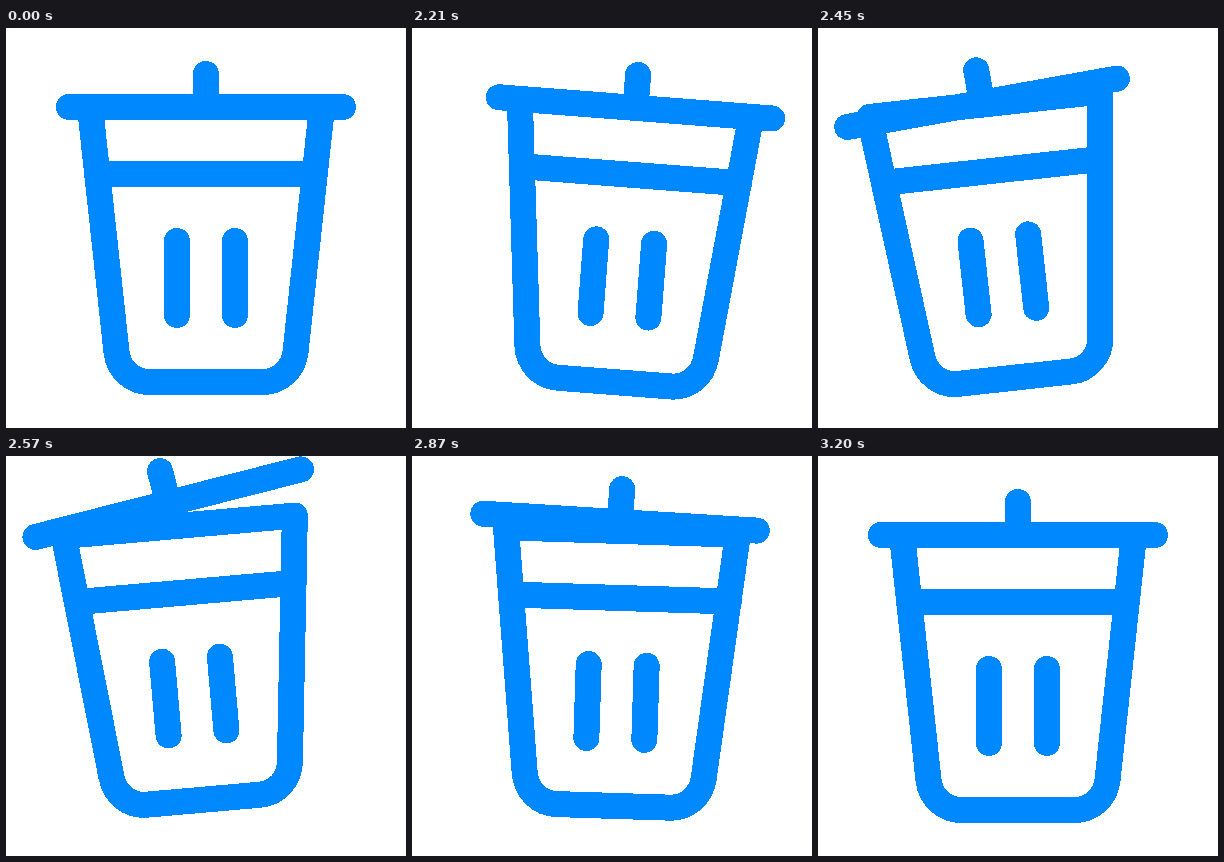
Recreate the animation shown at these times as an HTML page. Size 400 by 400 pixels, loop 3230 ms.

```html
<!DOCTYPE html>
<html lang="en">
<head>
<meta charset="utf-8">
<title>Trash can</title>
<style>
  html, body { margin: 0; height: 100%; overflow: hidden; background: #fff; }
  svg { display: block; width: 100vw; height: 100vh; shape-rendering: crispEdges; }
  g { fill: none; stroke: #08f; stroke-width: 26; stroke-linecap: round; stroke-linejoin: round; }
</style>
</head>
<body>
<svg viewBox="0 0 400 400">
  <g id="can">
    <path d="M84 79L110.500 324C112.500 341 126 354 143 354H257C274 354 287.500 341 289.500 324L316 79Z"/>
    <path d="M91 146H309M171 213V287M229 213V287"/>
    <g id="lid"><path d="M63 79H337M200 46V79"/></g>
  </g>
</svg>
<script>
const LOOP = 3230, START = 2030, STEP = 30;

// Smooth rise from 0 to 1 at the peak and back to 0 at the end.
function hump(t, start, peak, end) {
  if (t <= start || t >= end) return 0;
  const p = t < peak ? (t - start) / (peak - start) : (end - t) / (end - peak);
  return (1 - Math.cos(Math.PI * p)) / 2;
}

function pose(id, x, y, turn, pivotY) {
  document.getElementById(id).setAttribute('transform',
    `translate(${x} ${y}) rotate(${turn} 200 ${pivotY})`);
}

function draw() {
  const now = performance.now() % LOOP;
  const t = now < START ? 0 : START + Math.floor((now - START) / STEP) * STEP;

  // The can sways right, left, right, hops in between and lands on its left.
  const sway = 4.8 * hump(t, 2030, 2250, 2470) - 6.5 * hump(t, 2250, 2470, 2840)
    + 2.2 * hump(t, 2470, 2840, 3000);
  const hop = hump(t, 2300, 2660, 3000);
  const land = hump(t, 2840, 3000, 3200);
  pose('can', 3.6 * land, -12.2 * hop - 2.9 * land, sway - 2.5 * land, 384);

  // The lid lags behind, flips open, flies up and bounces once.
  const lag = hump(t, 2200, 2360, 2540);
  const flip = hump(t, 2360, 2540, 2750);
  const settle = hump(t, 2540, 2820, 3200);
  const drift = hump(t, 2360, 2650, 2960);
  const fly = hump(t, 2445, 2670, 2960);
  const bounce = hump(t, 2930, 3085, 3200);
  pose('lid', -11 * drift, -3.5 * lag - 40 * fly - 6 * bounce,
    2 * lag - 9.8 * flip + 1.8 * settle, 79);

  requestAnimationFrame(draw);
}
draw();
</script>
</body>
</html>
```
